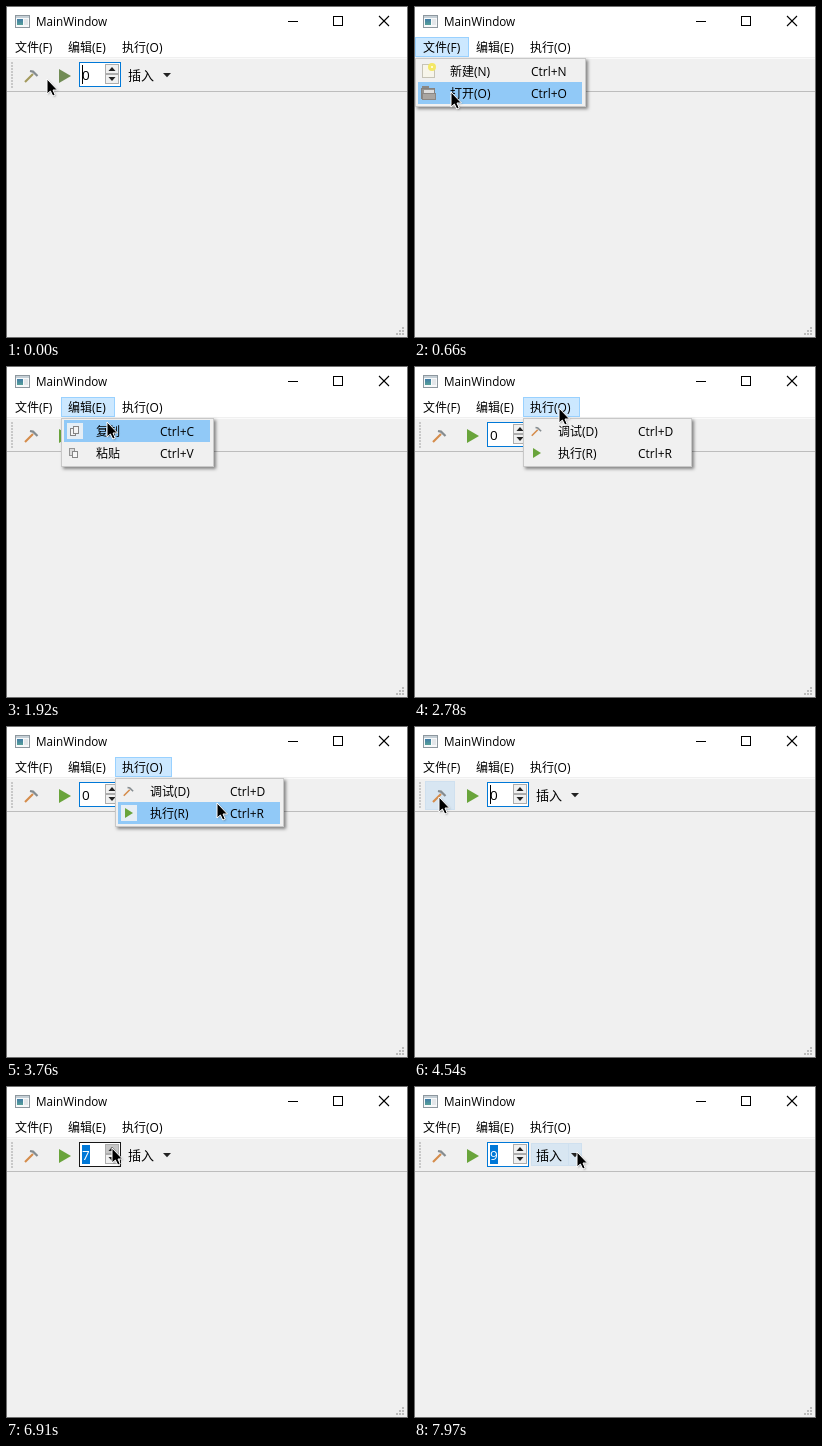
Animation of 402 by 332 pixels, one loop 8000 ms. Source, as an HTML page with a canvas:

```html
<!DOCTYPE html>
<html lang="zh">
<head>
<meta charset="utf-8">
<title>MainWindow</title>
<style>
html, body { margin: 0; width: 100%; height: 100%; overflow: hidden; background: #f0f0f0; }
canvas { display: block; }
</style>
</head>
<body>
<canvas id="stage" width="402" height="332"></canvas>
<script>
const ctx = document.getElementById('stage').getContext('2d');
const LOOP = 8000;
const FONT = '"Open Sans", "Noto Sans CJK SC", "Noto Sans CJK", sans-serif';
const BLUE = '#0078d7';
const ROW = 22;

const MENUS = [
  { title: '文件(F)', x: 1, head: 54, w: 171, keyX: 116, since: 0,
    rows: [['新建(N)', 'Ctrl+N', newIcon], ['打开(O)', 'Ctrl+O', openIcon]] },
  { title: '编辑(E)', x: 55, head: 54, w: 153, keyX: 99, since: 940,
    rows: [['复制', 'Ctrl+C', copyIcon], ['粘贴', 'Ctrl+V', pasteIcon]] },
  { title: '执行(O)', x: 109, head: 57, w: 169, keyX: 115, since: 2610,
    rows: [['调试(D)', 'Ctrl+D', smallHammer], ['执行(R)', 'Ctrl+R', smallPlay]] }
];

// Each click toggles the menus.
const CLICKS = [410, 1240, 1340, 4080];
const PRESS = 5810, REPEAT = 6150, RELEASE = 7220;

// Pointer strokes: start and end time, the point to bend towards, the point to reach.
const HOME = [41, 73];
const MOVES = [
  [30, 660, [28, -22], [37, 86]],
  [820, 1030, [60, 50], [88, 34]],
  [1600, 2390, [108, 67], [116, 88]],
  [2420, 2780, [132, 62], [145, 42]],
  [2990, 3790, [170, 132], [211, 77]],
  [3820, 4540, [200, 215], [25, 71]],
  [4640, 5440, [57, 78], [94, 69]],
  [5470, PRESS, [110, 62], [106, 62]],
  [RELEASE, 7970, [218, 74], [163, 66]]
];

function pointerAt(t) {
  let pos = HOME;
  for (const [from, to, bend, end] of MOVES) {
    if (t < from) break;
    const u = Math.min(1, (t - from) / (to - from));
    const s = u * u * (3 - 2 * u), r = 1 - s;
    pos = pos.map((v, k) => r * r * v + 2 * r * s * bend[k] + s * s * end[k]);
  }
  return { x: Math.round(pos[0]), y: Math.round(pos[1]) };
}

function openMenu(t) {
  if (CLICKS.filter(c => c <= t).length % 2 === 0) return null;
  return MENUS.filter(m => m.since <= t).pop();
}

// One step for the press, then steady repeats while the button is held.
function spinValue(t) {
  if (t < PRESS) return 0;
  return t < REPEAT ? 1 : Math.min(9, 2 + Math.floor((t - REPEAT) / 152));
}

function inside(p, x, y, w, h) {
  return p.x >= x && p.x < x + w && p.y >= y && p.y < y + h;
}

function rect(x, y, w, h, fill, edge) {
  if (fill) {
    ctx.fillStyle = fill;
    ctx.fillRect(x, y, w, h);
  }
  if (edge) {
    ctx.strokeStyle = edge;
    ctx.lineWidth = 1;
    ctx.strokeRect(x + .5, y + .5, w - 1, h - 1);
  }
}

function trace(points) {
  ctx.beginPath();
  points.forEach(([x, y]) => ctx.lineTo(x, y));
}

function poly(points, fill) {
  trace(points);
  ctx.closePath();
  ctx.fillStyle = fill;
  ctx.fill();
}

function stroke(points, color, width) {
  trace(points);
  ctx.strokeStyle = color;
  ctx.lineWidth = width;
  ctx.stroke();
}

function text(s, x, y, size = 12, color = '#000') {
  ctx.font = size + 'px ' + FONT;
  ctx.fillStyle = color;
  ctx.fillText(s, x, y);
}

function hammer(x, y, scale, handle = '#d58c4b') {
  ctx.save();
  ctx.translate(x, y);
  ctx.scale(scale, scale);
  stroke([[1, 13], [9, 5]], handle, 2.2);
  stroke([[6, 2], [9, 2.6], [13.5, 7]], '#858c90', 2.2);
  ctx.restore();
}

function play(x, y, w, h, color = '#69a43b') {
  poly([[x, y], [x + w, y + h / 2], [x, y + h]], color);
}

function smallHammer(x, y) { hammer(x + 3, y + 4, .75); }
function smallPlay(x, y) { play(x + 5, y + 4, 8, 10); }

function newIcon(x, y) {
  rect(x + 2, y + 2, 13, 14, '#f7f5ea', '#c6c3b6');
  ctx.beginPath();
  ctx.arc(x + 12, y + 5, 4, 0, 7);
  ctx.fillStyle = '#f3e766';
  ctx.fill();
  rect(x + 11, y + 4, 2, 2, '#fffbd0');
}

function openIcon(x, y) {
  rect(x + 2, y + 2, 7, 4, '#8b8885');
  rect(x + 1, y + 4, 14, 11, '#96938f', '#85827f');
  rect(x + 4, y + 6, 10, 4, '#dedede');
  rect(x + 2, y + 9, 14, 7, '#a9a5a1', '#8b8784');
}

function copyIcon(x, y) {
  rect(x + 4, y + 6, 6, 8, '#f4f4f4', '#858585');
  rect(x + 7, y + 4, 6, 8, '#f4f4f4', '#858585');
}

function pasteIcon(x, y) {
  rect(x + 3, y + 4, 6, 8, '#dcdcdc', '#959595');
  rect(x + 6, y + 7, 6, 7, '#f6f6f6', '#858585');
}

function drawFrame() {
  rect(0, 0, 402, 332, '#f0f0f0');
  rect(0, 0, 402, 51, '#fff');
  rect(1, 52, 400, 1, '#fafafa');
  rect(1, 85, 400, 1, '#bdbdbd');

  rect(9, 9, 15, 13, '#f7f9fa', '#8d979e');
  rect(10, 10, 13, 2, '#c5cfd6');
  const glow = ctx.createLinearGradient(0, 12, 0, 20);
  glow.addColorStop(0, '#3c75a8');
  glow.addColorStop(1, '#5aa696');
  rect(11, 13, 6, 6, glow);
  rect(18, 13, 4, 6, '#e3e7ea');
  text('MainWindow', 30, 20, 11.7);

  rect(282, 15, 10, 1, '#000');
  rect(327, 10, 10, 10, null, '#000');
  stroke([[373, 10], [383, 20]], '#000', 1.1);
  stroke([[383, 10], [373, 20]], '#000', 1.1);

  for (let i = 0; i < 3; i++)
    for (let j = 2 - i; j < 3; j++) rect(390 + 3 * j, 321 + 3 * i, 2, 2, '#bcbcbc');
}

function hoverBox(x, y, w, h) {
  rect(x, y, w, h, '#d8e6f2', '#cfe0ef');
}

function drawSpin(t, p, free) {
  const over = (x, y, w, h) => free && inside(p, x, y, w, h);
  rect(73, 56, 42, 25, '#fff', over(73, 56, 42, 25) ? '#171717' : BLUE);
  const value = spinValue(t);
  if (value) rect(76, 59, 8, 19, BLUE);
  text(String(value), 76, 74, 13.5, value ? '#fff' : '#000');
  if (free && !value && Math.floor(t / 530) % 2 === 0) rect(76, 59, 1, 19, '#000');

  const held = t >= PRESS && t < RELEASE;
  const fill = (y, down) => down ? '#c6c6c6' : over(99, y, 14, 10) ? '#dadada' : '#f0f0f0';
  rect(99, 58, 14, 10, fill(58, held), '#adadad');
  rect(99, 68, 14, 10, fill(68, false), '#adadad');
  poly([[102.5, 65], [106, 61], [109.5, 65]], '#222');
  poly([[102.5, 71], [109.5, 71], [106, 75]], '#222');
}

function drawToolbar(t, p, free) {
  for (let y = 56; y < 83; y += 3) rect(5, y, 2, 2, '#c8c8c8');
  const over = (x, w) => free && inside(p, x, 54, w, 30);
  for (const x of [11, 43]) if (over(x, 30)) hoverBox(x, 55, 30, 29);
  const dull = t < 30;
  hammer(18, 63, 1, dull ? '#a39a5c' : undefined);
  play(53, 63, 12, 14, dull ? '#718c55' : undefined);
  drawSpin(t, p, free);
  if (over(117, 51)) {
    hoverBox(117, 57, 38, 23);
    hoverBox(154, 57, 14, 23);
  }
  text('插入', 122, 74, 13);
  poly([[157, 67], [165, 67], [161, 71.3]], '#222');
}

function drawMenu(m, p) {
  ctx.save();
  ctx.shadowColor = 'rgba(0,0,0,.45)';
  ctx.shadowBlur = 3;
  ctx.shadowOffsetX = ctx.shadowOffsetY = 2;
  rect(m.x, 52, m.w, 49, '#f0f0f0');
  ctx.restore();
  rect(m.x, 52, m.w, 49, null, '#c8c8c8');
  m.rows.forEach(([label, key, icon], i) => {
    const y = 54 + ROW * i;
    if (inside(p, m.x, y, m.w, ROW)) {
      rect(m.x + 3, y, m.w - 7, ROW, '#91c9f7');
      if (m !== MENUS[0]) rect(m.x + 6, y + 3, 16, 16, '#e6eef5');
    }
    icon(m.x + 5, y + 2);
    text(label, m.x + 35, y + 16);
    text(key, m.x + m.keyX, y + 16);
  });
}

function drawPointer({ x, y }) {
  ctx.save();
  ctx.translate(x, y);
  ctx.shadowColor = 'rgba(0,0,0,.3)';
  ctx.shadowBlur = 2;
  ctx.shadowOffsetX = ctx.shadowOffsetY = 1;
  poly([[0, 0], [0, 15], [3.4, 12], [5.8, 17], [8.2, 16], [6, 11], [10.5, 11]], '#000');
  ctx.shadowColor = 'transparent';
  ctx.strokeStyle = '#fff';
  ctx.lineWidth = 1;
  ctx.stroke();
  ctx.restore();
}

function draw(t) {
  const p = pointerAt(t);
  const open = openMenu(t);
  drawFrame();
  drawToolbar(t, p, !open);
  MENUS.forEach(m => {
    if (m === open || (!open && inside(p, m.x, 31, m.head, 20)))
      rect(m.x, 31, m.head, 20, '#cce8ff', '#99d1ff');
    text(m.title, Math.max(9, m.x + 7), 46);
  });
  if (open) drawMenu(open, p);
  rect(0, 0, 402, 332, null, '#707070');
  drawPointer(p);
}

const start = performance.now();
function tick() {
  draw((performance.now() - start) % LOOP);
  requestAnimationFrame(tick);
}
tick();
</script>
</body>
</html>
```
